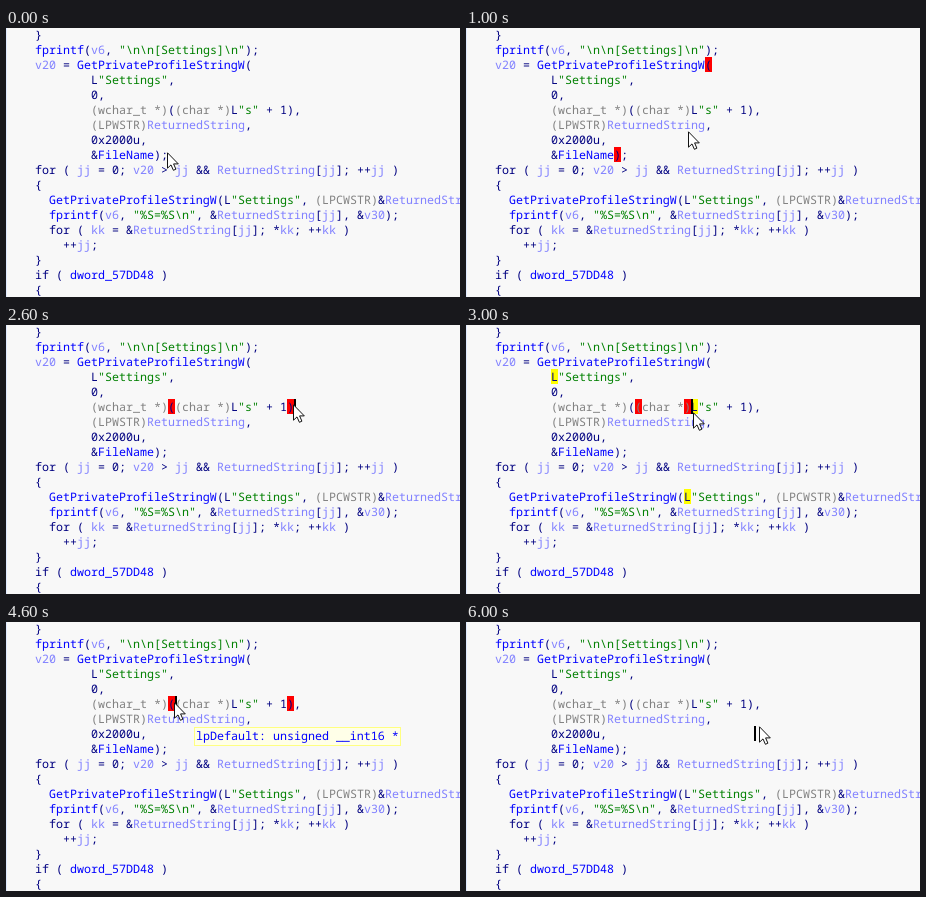
Animation, 454 px wide and 269 px high, one loop 7 s. Source, as an HTML page:

```html
<!DOCTYPE html>
<html lang="en">
<head>
<meta charset="utf-8">
<title>Pseudocode view</title>
<style>
html, body { margin: 0; width: 100%; height: 100%; overflow: hidden; background: #f8f8f8; }
svg { display: block; }
text {
  font: 11.667px "Noto Sans Mono", "DejaVu Sans Mono", monospace;
  font-variant-ligatures: none;
  text-rendering: geometricPrecision;
  white-space: pre;
}
</style>
</head>
<body>
<svg id="stage" width="454" height="269" viewBox="0 0 454 269">
  <rect width="454" height="269" fill="#f8f8f8"/>
  <rect width="1" height="269" fill="#dfeaff"/>
  <g id="marks" shape-rendering="crispEdges"></g>
  <g id="code"></g>
  <rect id="caret" width="2" height="15" shape-rendering="crispEdges"/>
  <g id="tip">
    <rect x="188.5" y="105.5" width="206" height="18" fill="#ffffe8" stroke="#ffff80"/>
    <text x="190" y="118" fill="#0000ff">lpDefault: unsigned __int16 *</text>
  </g>
  <path id="pointer" d="M.5 .8V16.2L4 12.9 6.4 18.3 8.9 17.2 6.6 11.9H11.3Z"
        fill="#fff" stroke="#111" stroke-width="1" stroke-linejoin="round"/>
</svg>
<script>
const CELL = 7, LINE = 15, LEFT = 1, HOLD = 1000;
const NAVY = '#000080', BLUE = '#0000ff', GREEN = '#008000', VIOLET = '#8080ff', GREY = '#808080';
const RED = '#ff0000', YELLOW = '#ffff00';

const lines = String.raw`
    }
    fprintf(v6, "\n\n[Settings]\n");
    v20 = GetPrivateProfileStringW(
            L"Settings",
            0,
            (wchar_t *)((char *)L"s" + 1),
            (LPWSTR)ReturnedString,
            0x2000u,
            &FileName);
    for ( jj = 0; v20 > jj && ReturnedString[jj]; ++jj )
    {
      GetPrivateProfileStringW(L"Settings", (LPCWSTR)&ReturnedString[jj],
      fprintf(v6, "%S=%S\n", &ReturnedString[jj], &v30);
      for ( kk = &ReturnedString[jj]; *kk; ++kk )
        ++jj;
    }
    if ( dword_57DD48 )
    {`.slice(1).split('\n');

const $ = id => document.getElementById(id);
const colX = col => LEFT + col * CELL;
const rowY = row => row * LINE - 1;

function add(parent, tag, attrs, label = '') {
  const el = document.createElementNS('http://www.w3.org/2000/svg', tag);
  for (const key in attrs) el.setAttribute(key, attrs[key]);
  el.textContent = label;
  parent.appendChild(el);
}

// Groups: string, cast, local variable, global name; anything else is plain code.
const token = /("[^"]*")|(\((?:wchar_t \*|char \*|LPC?WSTR)\))|\b(v\d+|jj|kk|ReturnedString)\b|\b(fprintf|GetPrivateProfileStringW|FileName|dword_\w+)\b|\w+|[^\w\s]/g;
const groupFill = [GREEN, GREY, VIOLET, BLUE];

lines.forEach((line, row) => {
  for (const m of line.matchAll(token)) {
    const fill = groupFill[m.slice(1).findIndex(Boolean)] || NAVY;
    add($('code'), 'text', { x: colX(m.index), y: rowY(row) + 12, fill }, m[0]);
  }
});

const mark = (row, col, fill = RED, len = 1) => ({ row, col, fill, len });
const outer = [mark(5, 23), mark(5, 40)];
const inner = [mark(5, 24), mark(5, 31)];

const scenes = [
  { at: [161, 124], marks: [] },
  { at: [222, 103], marks: [mark(2, 34), mark(8, 21)] },
  { at: [287, 79], marks: outer, caret: [5, 41] },
  { at: [227, 87], caret: [5, 32],
    marks: [...inner, mark(3, 12, YELLOW), mark(5, 32, YELLOW), mark(11, 31, YELLOW)] },
  { at: [168, 80], marks: outer, caret: [5, 24], tip: true },
  { at: [168, 80], marks: [...inner, mark(5, 25, YELLOW, 4)], caret: [5, 25] },
  { at: [293, 104], marks: [], caret: [7, 41] }
];

const show = (el, on) => el.setAttribute('visibility', on ? 'visible' : 'hidden');
let shown = -1;

function render(ms) {
  const index = Math.floor(ms / HOLD) % scenes.length;
  if (index === shown) return;
  shown = index;
  const { at, marks, caret, tip } = scenes[index];
  $('marks').replaceChildren();
  for (const m of marks) {
    add($('marks'), 'rect', {
      x: colX(m.col), y: rowY(m.row), width: m.len * CELL, height: LINE, fill: m.fill
    });
  }
  show($('caret'), caret);
  if (caret) {
    $('caret').setAttribute('x', colX(caret[1]));
    $('caret').setAttribute('y', rowY(caret[0]));
  }
  show($('tip'), tip);
  $('pointer').setAttribute('transform', `translate(${at})`);
}

const start = performance.now();
function tick() {
  render(performance.now() - start);
  requestAnimationFrame(tick);
}
tick();
</script>
</body>
</html>
```
